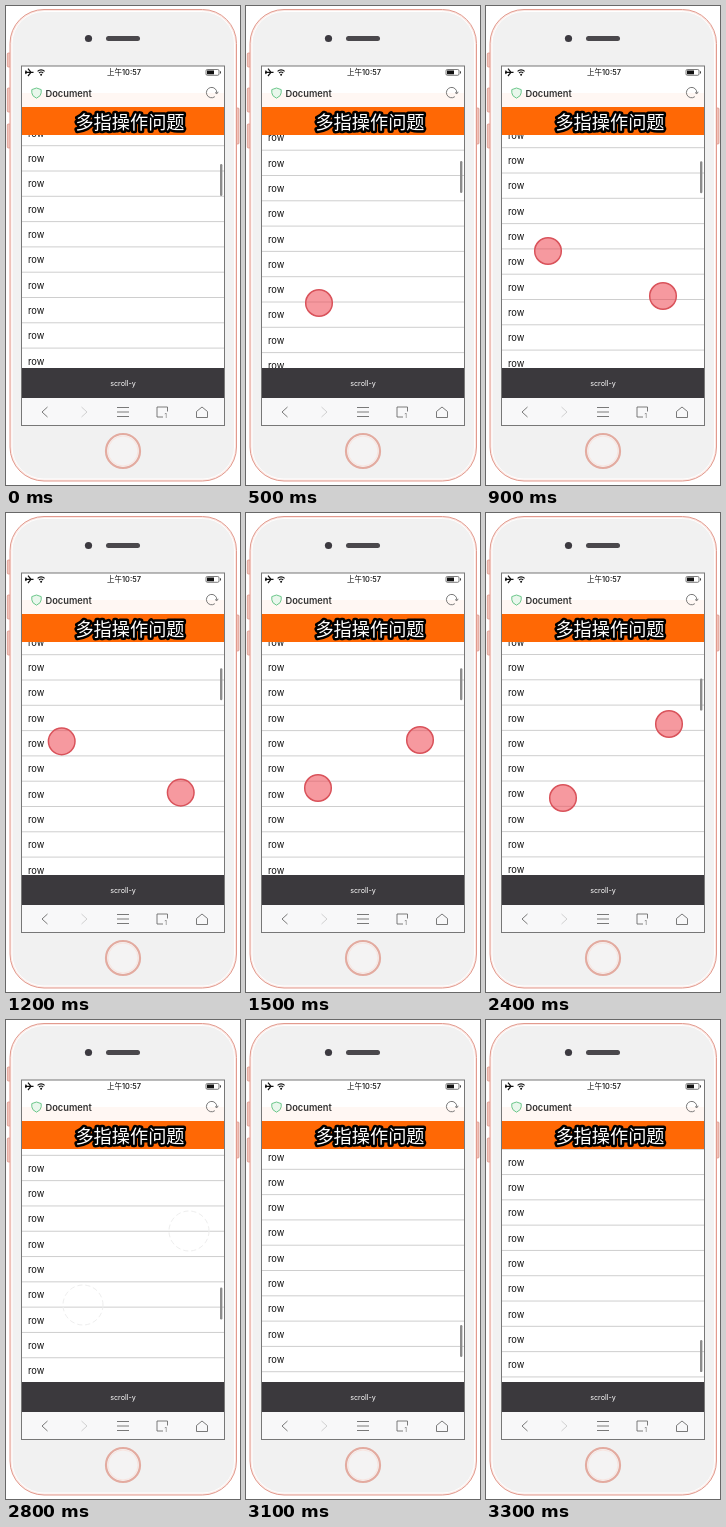
Recreate the animation shown at these times as an HTML page. Size 234 by 479 pixels, loop 3400 ms.

```html
<!DOCTYPE html>
<html lang="zh">
<head>
<meta charset="utf-8">
<title>Scroll</title>
<style>
html, body { margin: 0; width: 100%; height: 100%; overflow: hidden; background: #fff; }
svg { display: block; width: 234px; height: 479px; }
text { font-family: Inter, "Noto Sans CJK SC", "Noto Sans CJK", sans-serif; }
.icon { fill: none; stroke: #6b6b6b; stroke-width: .9; }
.finger { fill: #ee4650; fill-opacity: .55; stroke: #d9525a; stroke-width: 1.5; }
.finger.ghost { fill: none; stroke: #eee; stroke-width: 1; stroke-dasharray: 5 3; }
</style>
</head>
<body>
<svg viewBox="0 0 234 479">
  <defs>
    <clipPath id="list"><rect x="16" y="129" width="202" height="233"/></clipPath>
  </defs>

  <!-- phone body -->
  <g fill="#f0c4bb" stroke="#d98e82" stroke-width=".7">
    <rect x="1.3" y="47" width="4" height="14" rx="1"/>
    <rect x="1.3" y="82" width="4" height="24" rx="1"/>
    <rect x="1.3" y="118" width="4" height="24" rx="1"/>
    <rect x="229" y="102" width="4" height="36" rx="1"/>
  </g>
  <rect x="4" y="3.5" width="226.5" height="471.5" rx="34" fill="#fbe9e5" stroke="#e29a8e"/>
  <rect x="6" y="5.5" width="222.5" height="467.5" rx="32" fill="#f1f1f1" stroke="#fff"/>
  <circle cx="82.5" cy="32.5" r="3.6" fill="#3c3a40"/>
  <rect x="100" y="30" width="34" height="5" rx="2.5" fill="#4a484c"/>
  <circle cx="117" cy="445" r="17" fill="#f4f3f3" stroke="#e3aba0" stroke-width="2.2"/>
  <circle cx="117" cy="445" r="15" fill="none" stroke="#f8e4df"/>

  <!-- screen -->
  <rect x="15.5" y="60" width="203" height="359.5" fill="#fff" stroke="#777"/>
  <g clip-path="url(#list)">
    <g id="rows"></g>
    <rect id="bar" x="214" width="2.4" height="32" rx="1.2" fill="#8c8c8c"/>
  </g>

  <!-- status bar -->
  <path d="M19 66.3h8.5M22 62.6l3 3.7-3 3.7M19.5 64.6l1.2 1.7-1.2 1.7" fill="none" stroke="#111" stroke-width="1.2"/>
  <path d="M31.6 65.3a5 5 0 0 1 7 0M33 67a3 3 0 0 1 4.200 0" fill="none" stroke="#111" stroke-width="1.1"/>
  <circle cx="35.1" cy="68.700" r="1" fill="#111"/>
  <text x="118" y="69.300" font-size="7.5" font-weight="500" text-anchor="middle" fill="#111">上午10:57</text>
  <rect x="200" y="63.500" width="13" height="5.800" rx="1.3" fill="none" stroke="#444" stroke-width=".7"/>
  <rect x="201" y="64.500" width="7" height="3.800" fill="#111"/>
  <path d="M214.500 65.300v2.200" stroke="#444"/>

  <!-- page header -->
  <rect x="16" y="87" width="202" height="14" fill="#fff7f3"/>
  <path d="M30.500 82l4.700 1.600v3.200q0 3.200-4.700 5.400q-4.700-2.200-4.700-5.400v-3.200z" fill="#e9f7ec" stroke="#6cc78b"/>
  <text x="39.500" y="90.500" font-size="9.300" font-weight="600" fill="#333">Document</text>
  <path class="icon" d="M208.800 90.700a5.200 5.200 0 1 1 2-3.700M209 86.500l1.900 1.300 1.300-2"/>
  <rect x="16" y="101" width="202" height="28" fill="#ff6805"/>
  <text x="124" y="122.500" font-size="18.200" font-weight="500" text-anchor="middle" fill="#fff" stroke="#000"
    stroke-width="5" stroke-linejoin="round" paint-order="stroke">多指操作问题</text>

  <!-- footer and toolbar -->
  <rect x="16" y="362" width="202" height="30" fill="#3b393d"/>
  <text x="117" y="380" font-size="7.200" text-anchor="middle" fill="#fff">scroll-y</text>
  <rect x="16" y="392" width="202" height="27" fill="#f8f8f9"/>
  <g class="icon">
    <path d="M41.500 401l-5.500 5 5.500 5"/>
    <path d="M75.500 401l5.500 5-5.500 5" stroke="#ccc"/>
    <path d="M111 401.500h12M111 406h12M111 410.500h12"/>
    <path d="M157 411h-6v-10h10.500v4.500"/>
    <path d="M190.500 405.500l5.500-4.500 5.500 4.500v6h-11z"/>
  </g>
  <text x="158.500" y="411.500" font-size="6" fill="#666">1</text>

  <circle class="finger" id="left"/>
  <circle class="finger" id="right"/>
</svg>

<script>
const LOOP = 3400, STEP = 100, ROW = 25.3, RELEASE = 2400;
const get = id => document.getElementById(id);

// keys: [time, ...values]
const scrollKeys = [[0, 0], [200, 0], [500, -29.8], [600, -27.3], [2200, -27.3], [RELEASE, 74.1]];
const leftKeys = [[200, 74, 267], [500, 73, 297], [900, 62, 245], [1050, 50, 212],
  [1500, 72, 275], [2000, 46, 208], [RELEASE, 77, 285]];
const rightKeys = [[700, 180, 262], [900, 177, 290], [1050, 175, 298],
  [1500, 174, 227], [2000, 173, 298], [RELEASE, 183, 211]];

function tween(keys, t) {
  const i = keys.findIndex(k => k[0] > t);
  if (i < 0) return keys[keys.length - 1].slice(1);
  if (i === 0) return keys[0].slice(1);
  const a = keys[i - 1], b = keys[i];
  const u = (t - a[0]) / (b[0] - a[0]), e = u * u * (3 - 2 * u);
  return a.slice(1).map((v, n) => v + (b[n + 1] - v) * e);
}

// drag, then momentum that decays after the release
function scrollAt(t) {
  const glide = t > RELEASE ? 1803 * (1 - Math.exp((RELEASE - t) / 500)) : 0;
  return tween(scrollKeys, t)[0] + glide;
}

function drawFinger(el, keys, t) {
  const [x, y] = tween(keys, t), u = Math.max(0, (t - RELEASE) / 300);
  const ghost = u >= 1;
  el.setAttribute("cx", x);
  el.setAttribute("cy", y);
  el.setAttribute("r", 13.3 + 6.7 * Math.min(1, u));
  el.setAttribute("opacity", t < keys[0][0] || t >= 3000 ? 0 : ghost ? 1 : 1 - u);
  el.classList.toggle("ghost", ghost);
}

let rows = "";
for (let i = 0; i < 12; i++) {
  const y = i * ROW;
  rows += `<text x="22" y="${y + 3.2}" font-size="9.3" fill="#111">row</text>` +
    `<path d="M16 ${y + 12}h202" stroke="#c9c9c9" stroke-width=".9"/>`;
}
get("rows").innerHTML = rows;

function draw(now) {
  const t = Math.floor(now % LOOP / STEP) * STEP;
  const s = scrollAt(t);
  const offset = ((153 - s) % ROW + ROW) % ROW;
  get("rows").setAttribute("transform", `translate(0 ${offset + 4 * ROW})`);
  get("bar").setAttribute("y", 158 + s / 9.74);
  drawFinger(get("left"), leftKeys, t);
  drawFinger(get("right"), rightKeys, t);
}

const start = performance.now();
function frame() {
  draw(performance.now() - start);
  requestAnimationFrame(frame);
}
frame();
</script>
</body>
</html>
```
